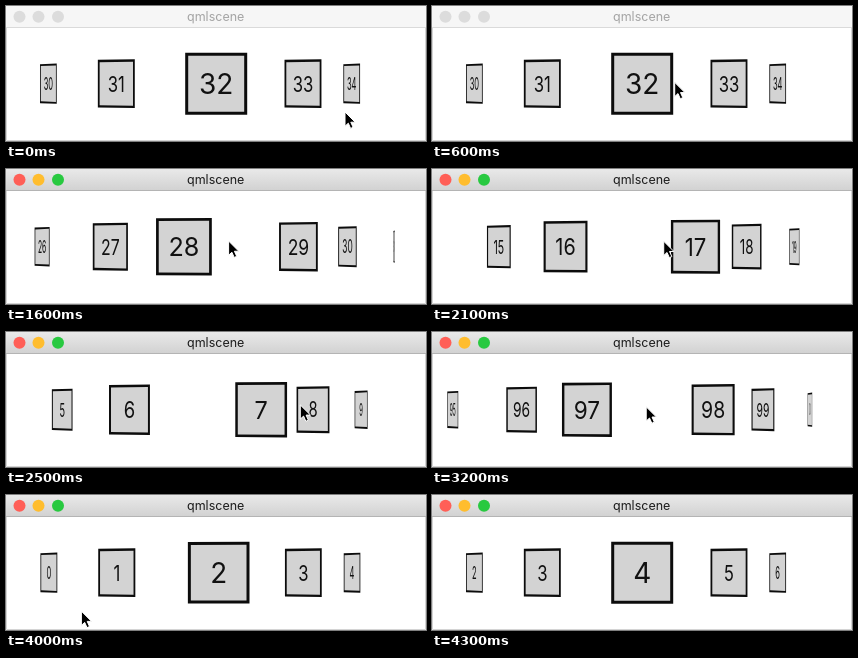
Write an HTML page that moves like this. It is 420 px wide and 135 px high and loops after 4400 ms.

```html
<!DOCTYPE html>
<html lang="en">
<head>
<meta charset="utf-8">
<title>Path view</title>
<style>
  html, body { margin: 0; width: 100%; height: 100%; overflow: hidden; background: #fff; }
  svg { display: block; width: 100%; height: 100%; }
  text { text-anchor: middle; font-family: Inter, Roboto, sans-serif; }
  .title { font-size: 12.5px; }
  .num { font-size: 28px; fill: #111; }
</style>
</head>
<body>
<svg viewBox="0 0 420 135">
  <defs>
    <linearGradient id="bar" x2="0" y2="1">
      <stop stop-color="#e9e9e9"/><stop offset="1" stop-color="#d2d2d2"/>
    </linearGradient>
  </defs>
  <rect width="420" height="135" fill="#fff"/>
  <g id="items"></g>
  <path d="M.5 21V134.5H419.5V21" fill="none" stroke="#d4d4d4"/>
  <rect id="head" width="420" height="21"/>
  <path id="rule" d="M0 21.5H420"/>
  <g id="dots">
    <circle cx="13.5" cy="10.8" r="6"/>
    <circle cx="32.5" cy="10.8" r="6"/>
    <circle cx="52" cy="10.8" r="6"/>
  </g>
  <text id="title" class="title" x="209.7" y="15">qmlscene</text>
  <circle id="press" r="21" fill="none" stroke="#111" stroke-width="1.5"/>
  <path id="cursor" d="M0 0V14.2L3.3 11.2L5.6 16.4L8.1 15.3L5.8 10.2H10.2Z"
        fill="#000" stroke="#fff" stroke-width="1" stroke-linejoin="round"/>
</svg>
<script>
const LOOP = 4400, STEP = 100, W = 420, SIZE = 62, COUNT = 100;
const $ = id => document.getElementById(id);

// [time, list position]
const scroll = [[1100, 32], [1600, 28.09], [2500, 6.8], [3200, -2.69], [3400, -3.3], [3700, -1.18], [4300, 4]];
// [time, x, y] of the pointer tip, without the swipes
const pointer = [[100, 339, 106], [700, 235, 74], [1100, 235, 74], [1650, 214, 72], [3250, 206, 75], [3700, 116, 85], [4300, 55, 142]];
// Repeated swipes to the right, then one drag to the left
const swipe = { from: 1650 - 1600 / 3, to: 3250, period: 1600 / 3, reach: 92 };

// Monotone cubic through the points of column c
function curve(pts, t, c = 1) {
  const last = pts.length - 1;
  if (t <= pts[0][0]) return pts[0][c];
  if (t >= pts[last][0]) return pts[last][c];
  const slope = i => (pts[i + 1][c] - pts[i][c]) / (pts[i + 1][0] - pts[i][0]);
  const tangent = i => {
    if (i === 0 || i === last) return 0;
    const a = slope(i - 1), b = slope(i);
    return a * b > 0 ? 2 * a * b / (a + b) : 0;
  };
  let i = 0;
  while (t >= pts[i + 1][0]) i++;
  const h = pts[i + 1][0] - pts[i][0], p = (t - pts[i][0]) / h, q = 1 - p;
  return pts[i][c] * q * q * (1 + 2 * p) + pts[i + 1][c] * p * p * (3 - 2 * p)
    + h * p * q * (tangent(i) * q - tangent(i + 1) * p);
}

function pointerAt(t) {
  const turns = (t - swipe.from) / swipe.period;
  const swiping = t >= swipe.from && t < swipe.to;
  const push = swiping ? swipe.reach * (1 - Math.cos(2 * Math.PI * turns)) / 2 : 0;
  const dragging = t >= swipe.to && t < swipe.to + 300;
  return {
    x: curve(pointer, t, 1) + push,
    y: curve(pointer, t, 2),
    down: dragging || t >= swipe.from - STEP && t < swipe.to && (turns + 1.05) % 1 < 0.4
  };
}

function node(name, parent, cls) {
  const el = document.createElementNS('http://www.w3.org/2000/svg', name);
  if (cls) el.setAttribute('class', cls);
  return parent.appendChild(el);
}

const boxes = Array.from({ length: 7 }, () => {
  const g = node('g', $('items'));
  const frame = node('path', g), face = node('path', g), label = node('text', g, 'num');
  frame.setAttribute('fill', '#0c0c0c');
  face.setAttribute('fill', '#d3d3d3');
  label.setAttribute('y', 10.3);
  return { g, frame, face, label };
});

const quad = (r, k) => `M${-r} ${k - r}L${r} ${-r - k}V${r + k}L${-r} ${r - k}Z`;

// The path runs fast near the middle and slowly along both sides
function place(u) {
  const a = Math.abs(u), near = 0.12;
  const dist = a < near ? a / near * 0.2 : 0.2 + 0.8 * (a - near) / (3 - near);
  const angle = dist * Math.PI / 2, cos = Math.cos(angle);
  return {
    x: W / 2 + 0.2 + Math.sign(u) * dist * W / 2 - 28 * (1 - cos),
    scale: 1 - dist / 2,
    cos,
    tilt: 0.5 * Math.sin(angle)
  };
}

function drawBox(box, n, u) {
  const shown = Math.abs(u) < 3;
  box.g.style.display = shown ? '' : 'none';
  if (!shown) return;
  const { x, scale, cos, tilt } = place(u);
  box.g.setAttribute('transform',
    `translate(${x} 77.7) scale(${scale * Math.max(cos, 0.015)} ${scale})`);
  box.frame.setAttribute('d', quad(SIZE / 2, tilt));
  box.face.setAttribute('d', quad(SIZE / 2 - 3, tilt));
  box.label.textContent = (n % COUNT + COUNT) % COUNT;
}

function draw(t) {
  const pos = curve(scroll, t), first = Math.round(pos) - 3;
  boxes.forEach((box, i) => drawBox(box, first + i, first + i - pos));

  const active = t >= 700;
  $('head').setAttribute('fill', active ? 'url(#bar)' : '#f6f6f6');
  $('rule').setAttribute('stroke', active ? '#b4b4b4' : '#dadada');
  $('title').setAttribute('fill', active ? '#1c1c1c' : '#a4a4a4');
  const colors = active ? ['#ff5f57', '#ffbd2e', '#28c940'] : Array(3).fill('#dcdcdc');
  [...$('dots').children].forEach((dot, i) => dot.setAttribute('fill', colors[i]));

  const { x, y, down } = pointerAt(t);
  for (const id of ['cursor', 'press']) $(id).setAttribute('transform', `translate(${x} ${y})`);
  $('press').style.display = down ? '' : 'none';
}

const start = performance.now();
function tick() {
  const t = (performance.now() - start) % LOOP;
  draw(Math.floor(t / STEP) * STEP);
  requestAnimationFrame(tick);
}
tick();
</script>
</body>
</html>
```
